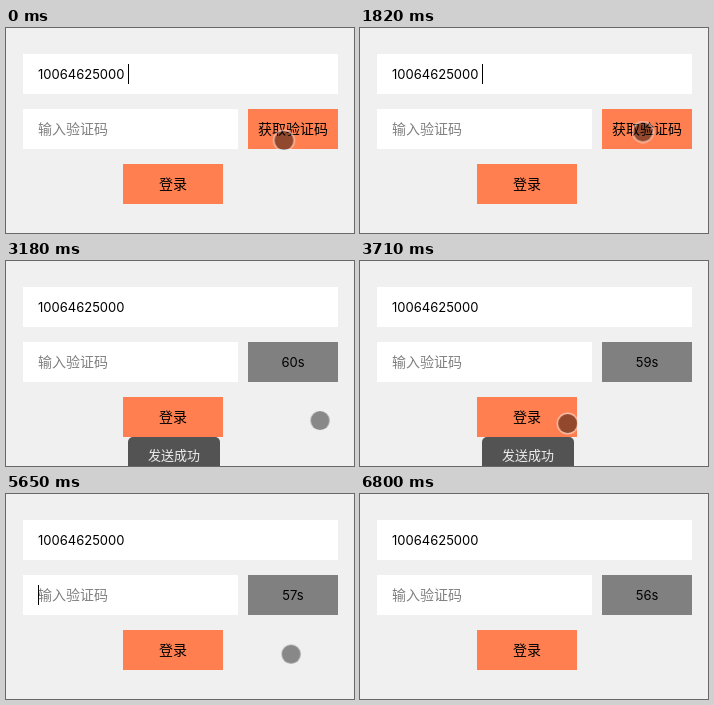
Recreate the animation shown at these times as an HTML page. Size 348x205 px, loop 6910 ms.

```html
<!DOCTYPE html>
<html lang="zh-CN">
<head>
<meta charset="utf-8">
<title>登录</title>
<style>
  html, body { margin: 0; width: 100%; height: 100%; overflow: hidden; background: #f0f0f0; }
  body {
    position: relative;
    color: #000;
    font: 14px/38px "Noto Sans CJK SC", "Noto Sans CJK", sans-serif;
    --loop: 6.91s;
  }
  body > div, .caret { position: absolute; box-sizing: border-box; white-space: nowrap; }
  .field { left: 17px; height: 40px; padding-left: 15px; background: #fff; }
  .phone { top: 26px; width: 315px; }
  .code { top: 81px; width: 215px; color: #808080; }
  .num { font-family: Inter, "Noto Sans CJK SC", sans-serif; font-size: 13px; line-height: 40px; }

  .caret { top: 10px; width: 1px; height: 20px; background: #000; }
  .phone .caret { left: 105px; animation: blink-phone var(--loop) step-end infinite; }
  .code .caret { left: 15px; animation: blink-code var(--loop) step-end infinite; }

  .send { left: 242px; top: 81px; width: 90px; height: 40px; overflow: hidden; text-align: center; }
  .strip { animation: count var(--loop) step-end infinite; }
  .strip > div { height: 40px; background: #808080; }
  .strip > .idle { background: #ff7f50; }

  .login { left: 117px; top: 136px; width: 100px; height: 40px; background: #ff7f50; text-align: center; }

  .toast {
    left: 122px; top: 176px; width: 92px; height: 38px;
    border-radius: 5px;
    background: rgba(17, 17, 17, .7);
    color: #eee;
    font-size: 13px;
    line-height: 36px;
    text-align: center;
    opacity: 0;
    animation: toast var(--loop) linear infinite;
  }

  .pointer {
    left: -10px; top: -10px; width: 19px; height: 19px;
    border-radius: 50%;
    background: rgba(0, 0, 0, .43);
    box-shadow: 0 0 0 1.5px rgba(240, 240, 240, .55);
    animation: roam var(--loop) linear infinite;
  }

  @keyframes blink-phone {
    0%, 11.142%, 25.035% { opacity: 1; }
    4.196%, 18.088%, 31.547%, 100% { opacity: 0; }
  }
  @keyframes blink-code {
    0%, 84.514%, 98.407%, 100% { opacity: 0; }
    77.567%, 91.461% { opacity: 1; }
  }
  @keyframes count {
    0% { transform: translateY(0); }
    34.152% { transform: translateY(-40px); }
    48.624% { transform: translateY(-80px); }
    63.096% { transform: translateY(-120px); }
    77.567% { transform: translateY(-160px); }
    92.039%, 100% { transform: translateY(-200px); }
  }
  @keyframes toast {
    0%, 34.1% { opacity: 0; }
    35.8%, 54% { opacity: 1; }
    57.7%, 100% { opacity: 0; }
  }
  @keyframes roam {
    0% { transform: translate(278.5px, 113px); }
    15% { transform: translate(278.5px, 113px); animation-timing-function: ease-in-out; }
    21.27%, 24.2% { transform: translate(295px, 106px); }
    26.33% { transform: translate(283.5px, 104.5px); }
    28.94% { transform: translate(283.5px, 104.5px); animation-timing-function: step-start; }
    28.942%, 33.6% { transform: translate(277px, 105px); }
    35.88% { transform: translate(305.5px, 139.5px); animation-timing-function: ease-out; }
    39.21% { transform: translate(317.5px, 160px); }
    45.5% { transform: translate(317.5px, 160px); animation-timing-function: ease-in-out; }
    50.21%, 52.3% { transform: translate(202.5px, 162px); }
    53.68% { transform: translate(208px, 163px); animation-timing-function: ease-out; }
    57.74% { transform: translate(226px, 165.5px); }
    60.7% { transform: translate(226px, 165.5px); animation-timing-function: ease-in-out; }
    65.41%, 79.5% { transform: translate(159.5px, 97.5px); }
    81.76% { transform: translate(285.5px, 160.5px); animation-timing-function: ease-out; }
    85.4% { transform: translate(298.5px, 180px); }
    89.29%, 89.8% { transform: translate(296px, 193.5px); }
    92.4% { transform: translate(322px, 194px); }
    94.93%, 100% { transform: translate(312px, 218px); }
  }
</style>
</head>
<body>
  <div class="field phone num">10064625000<span class="caret"></span></div>
  <div class="field code">输入验证码<span class="caret"></span></div>
  <div class="send">
    <div class="strip">
      <div class="idle">获取验证码</div>
      <div class="num">60s</div>
      <div class="num">59s</div>
      <div class="num">58s</div>
      <div class="num">57s</div>
      <div class="num">56s</div>
    </div>
  </div>
  <div class="login">登录</div>
  <div class="toast">发送成功</div>
  <div class="pointer"></div>
</body>
</html>
```
